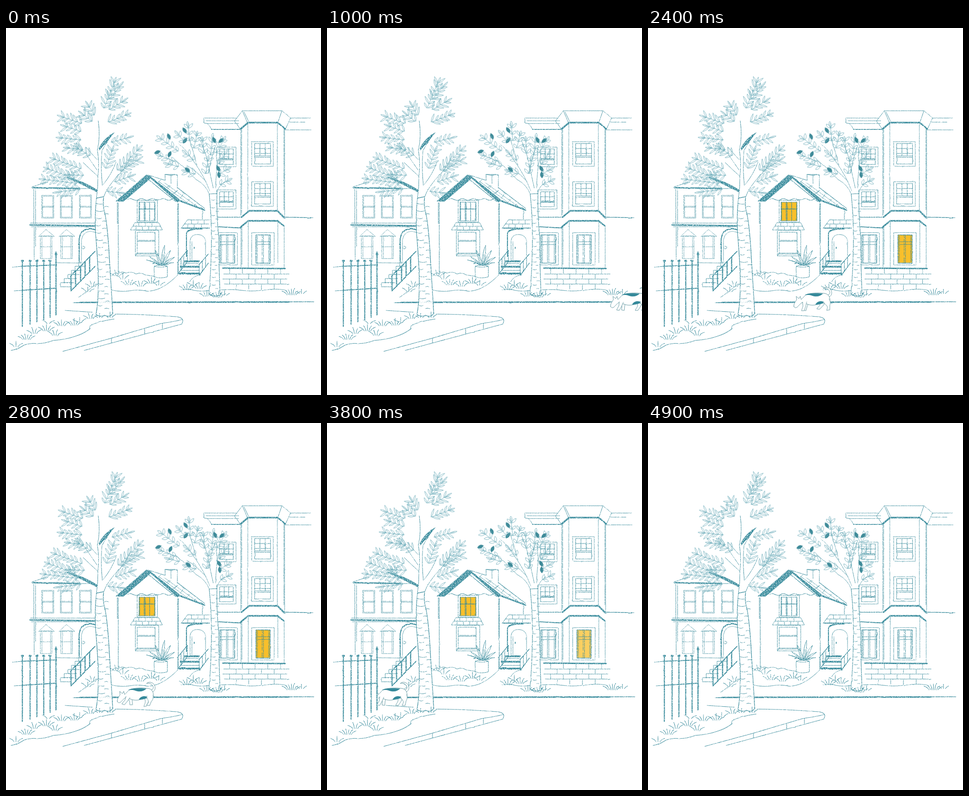
An HTML page that plays this animation: 693x807 px, repeating every 5 s.

```html
<!DOCTYPE html>
<html lang="en">
<head>
<meta charset="utf-8">
<title>Quiet street</title>
<style>
html, body { margin: 0; width: 100%; height: 100%; overflow: hidden; background: #fff; }
svg { display: block; width: 100%; height: 100%; }
path { fill: none; stroke: #35899a; stroke-linecap: round; stroke-linejoin: round; }
.solid { fill: #35899a; stroke: none; }
.white { fill: #fff; }
.leaf path { stroke: #70aebb; stroke-width: .9; }
.leaf .dark { fill: #3f8b99; stroke: #3f8b99; }
#pup path { stroke: #5a919b; stroke-width: .9; }
#pup .solid { fill: #35899a; stroke: none; }
.glow { fill: #f8bf2b; opacity: 0; }
#glowR { animation: glowR 5s infinite; }
#glowM { animation: glowM 5s infinite; }
@keyframes glowR {
  0%, 26% { opacity: 0; animation-timing-function: steps(3); }
  32%, 74% { opacity: 1; animation-timing-function: steps(4); }
  82%, 100% { opacity: 0; }
}
@keyframes glowM {
  0%, 38% { opacity: 0; animation-timing-function: steps(3); }
  44%, 84% { opacity: 1; animation-timing-function: steps(5); }
  94%, 100% { opacity: 0; }
}
.leaf { animation: sway 2.5s infinite; }
.leaf.b { --r: .35deg; }
@keyframes sway {
  0%, 100% { transform: translateX(-1.9px) rotate(calc(var(--r, .15deg) * -1)); animation-timing-function: steps(5); }
  20% { transform: translateX(1px) rotate(0deg); animation-timing-function: steps(5); }
  40% { transform: translateX(2px) rotate(var(--r, .15deg)); animation-timing-function: steps(5); }
  60% { transform: translateX(1.6px) rotate(.1deg); animation-timing-function: steps(5); }
  80% { transform: translateX(0) rotate(0deg); animation-timing-function: steps(5); }
}
#leaves1 .leaf { transform-origin: 206px 370px; }
#leaves2 .leaf { transform-origin: 457px 365px; }
#pup { animation: walk 5s infinite; }
@keyframes walk {
  0%, 12% { transform: translateX(709px); animation-timing-function: steps(4); }
  20% { transform: translateX(623px); animation-timing-function: steps(7); }
  34% { transform: translateX(479px); animation-timing-function: steps(7); }
  48% { transform: translateX(320px); animation-timing-function: steps(8); }
  64% { transform: translateX(168px); animation-timing-function: steps(11); }
  86% { transform: translateX(36px); animation-timing-function: steps(2); }
  90%, 100% { transform: translateX(-100px); }
}
.leg { animation: step .8s infinite; }
.leg.far { animation-delay: -.4s; }
.front { transform-origin: 25px 602px; }
.hind { transform-origin: 71px 600px; }
@keyframes step {
  0%, 100% { transform: rotate(-11deg); animation-timing-function: steps(4); }
  50% { transform: rotate(11deg); animation-timing-function: steps(4); }
}
</style>
</head>
<body>
<svg viewBox="0 0 693 807" preserveAspectRatio="none">
  <defs>
    <filter id="chalk" filterUnits="userSpaceOnUse" x="0" y="0" width="693" height="807" color-interpolation-filters="sRGB">
      <feTurbulence type="fractalNoise" baseFrequency=".07" numOctaves="2" seed="4" result="wob"/>
      <feDisplacementMap in="SourceGraphic" in2="wob" scale="2" xChannelSelector="R" yChannelSelector="G" result="ink"/>
      <feTurbulence type="fractalNoise" baseFrequency=".6" numOctaves="2" seed="9"/>
      <feColorMatrix values="0 0 0 0 0  0 0 0 0 0  0 0 0 0 0  3.6 0 0 0 -.85" result="grain"/>
      <feComposite in="ink" in2="grain" operator="in"/>
    </filter>
    <clipPath id="pastFence"><rect x="112" y="540" width="581" height="100"/></clipPath>
  </defs>
  <rect class="glow" id="glowR" x="550" y="455" width="31" height="61"/>
  <rect class="glow" id="glowM" x="293" y="383" width="35" height="41"/>
  <g id="back" filter="url(#chalk)"></g>
  <g clip-path="url(#pastFence)">
    <g id="pup">
      <path d="M77 592C86 589 86 579 80 573C76 569 68 569 65 573C70 571 76 573 79 578C82 584 78 587 74 587Z" class="white"/>
      <g class="leg far front"><path class="white" d="M22 602L26 612L25 620L31 621L32 611L34 602"/></g>
      <g class="leg far hind"><path class="white" d="M60 600C60 608 62 611 57 617L55 621L61 621L67 612L72 600"/></g>
      <path class="white" d="M1 612C0 606 5 602 7 597L6 590L12 595L15 590L17 597C22 593 25 587 31 585C43 582 61 582 71 584C79 587 81 594 80 602C74 608 68 605 62 605C50 610 39 611 30 607C25 606 22 605 20 603C15 606 11 611 8 614C5 616 1 615 1 612Z"/>
      <path class="solid" d="M25 587C34 582 54 583 65 584C58 591 49 592 39 588C33 586 30 588 25 587Z"/>
      <path class="solid" d="M48 608C52 601 60 599 66 602C67 606 59 608 48 608Z"/>
      <g class="leg front"><path class="white" d="M20 602L19 611L14 620L20 621L25 612L29 603"/></g>
      <g class="leg hind"><path class="white" d="M66 601C66 607 73 610 72 615L69 621L76 621L78 611C81 607 81 601 79 597"/></g>
    </g>
  </g>
  <g id="trunks" filter="url(#chalk)"></g>
  <g id="leaves1"></g>
  <g id="leaves2"></g>
</svg>
<script>
const NS = "http://www.w3.org/2000/svg";
const $ = id => document.getElementById(id);
let layer = $("back"), seed = 7;
const rnd = () => (seed = seed * 16807 % 2147483647) / 2147483647;
const n = v => v.toFixed(1);

function ink(d, w = 1, cls = "", to = layer) {
  const p = document.createElementNS(NS, "path");
  p.setAttribute("d", d);
  p.setAttribute("stroke-width", w);
  if (cls) p.setAttribute("class", cls);
  return to.appendChild(p);
}
const box = (x, y, x2, y2) => `M${x} ${y}H${x2}V${y2}H${x}Z`;

function tuft(x, y, count, size) {
  let d = "";
  for (let i = 0; i < count; i++) {
    const k = count > 1 ? i / (count - 1) * 2 - 1 : 0;
    const h = size * (1 - .45 * Math.abs(k)) * (.8 + .4 * rnd());
    const x0 = x + k * count * 1.4;
    d += `M${n(x0)} ${n(y)}Q${n(x0 + k * 2)} ${n(y - h * .6)} ${n(x0 + k * size * .75)} ${n(y - h)}`;
  }
  ink(d, 1.1);
}

// Right building
ink("M508 198H435L436 209L443 210L449 217L452 223H517M440 204H512M443 210H512", .9);
ink("M452 223H517", 1.6);
ink("M520 182H607L626 198L615 222L598 208L607 182M520 182L503 204L515 222L531 208L520 182M524 185L534 206", 1);
ink("M517 221L533 208H598L614 222", 3.6);
ink("M626 198H670M624 207H658M614 224H671", 1);
ink("M516.5 223V412M518.5 223V410M532 211V402M597 211V402M613 223V415M611.5 223V400", .9);
ink("M466 416H519M613 416L675 417", 1.3);
ink("M518 416L535 402H597L613 418", 3.4);
ink("M516 438L533 424H597L611 435", 3.4);
ink("M468 437L517 440", 2.2);
ink("M517 440V527M519 440V520M533 426V527M598 426V516M612 435V528", .9);

function sash(x, y, w, h) {
  const x2 = x + w, y2 = y + h, a = x + 6, b = x2 - 6, m = y + h * .58;
  ink(box(x, y, x2, y2), .9);
  ink(box(a, y + 4, b, y2 - 5) + `M${a} ${m}H${b}M${a} ${m + 3}H${b}`, 1.1);
  const third = (b - a) / 3;
  ink(`M${a + third} ${y + 4}V${m}M${b - third} ${y + 4}V${m}M${a} ${y + 15}H${b}M${a} ${y + 26}H${b}`, 1.1);
}
sash(541, 250, 47, 54);
sash(541, 338, 47, 54);
sash(464, 262, 42, 43);
sash(464, 356, 42, 42);

function casement(x, a, b, x2) {
  const c = (a + b) / 2;
  ink(box(x, 450, x2, 521), .9);
  ink(box(a, 455, b, 517), 1.7);
  ink(`M${c - 2} 456V517M${c + 1} 456V517M${a} 470H${b}M${a} 476H${b}M${a + 3} 456V516M${b - 3} 456V516`, 1);
}
casement(541, 550, 581, 590);
casement(468, 471, 503, 509);

ink("M477 528L614 529", 3);
ink("M479 541H623M477 552H618M480 563H622M473 576Q500 574 520 577T570 576T617 577", 1);
let ticks = "";
for (let r = 0; r < 4; r++)
  for (let x = 492 + (r % 2) * 14; x < 618; x += 28) ticks += `M${x} ${530 + r * 11.5}v10`;
ink(ticks, 1);

// Street
ink("M148 604L300 603L677 602", 1.4);
ink("M163 603.5L330 603L622 602.5", 3.2);

// Middle house
ink("M310 323L242 381L258 382L318 331Z", 1, "solid");
ink("M309 323L318 326L382 377L378 384Z", 1, "solid");
ink("M309 323L242 381M258 382L313 333L374 382M312 323L350 335M377 351L437 397", 1.1);
ink("M380 379L436 400", 3.4);
ink("M350 335V322L363 324L377 322V352M363 324V342M350 322L377 322", 1);
ink("M334 336L397 383M348 340L420 392M341 333L335 339M362 347L355 355M378 357L370 364M366 366L376 358M390 366L383 374M404 377L396 386M418 386L412 392M352 352L360 346", .9);
ink("M268 377Q274 373 280 377T292 377T304 377T316 377T328 377T340 377T352 377T366 376", 1.1);
ink("M247 383V537M245 384V430M379 386V540M378 386V470M432 402V420", 1.1);
ink(box(289, 379, 333, 427) + box(293, 383, 328, 424), 1);
ink("M304 383V424M306 383V424M316 383V424M293 398H328M294 383V424M327 383V424", 1.3);
ink("M284 428H336L344 444H274ZM279 436H340M292 429V436M306 429V436M321 429V436M286 437V443M300 437V443M314 437V443M330 437V443", 1);
ink(box(285, 445, 336, 501) + box(289, 449, 328, 495) + "M289 467H328M289 469H328M284 497H336M289 495L285 501M328 495L336 501", 1);

// Porch and steps
ink("M399 422H448M399 422L386 440M392 431H446M408 423V430M422 423V430M436 423V430M400 432V439M414 432V439M430 432V439", 1);
ink("M386 440H447", 2.2);
ink("M397 503V452Q399 444 409 442M399 448Q408 441 432 442", 2.2);
ink("M405 512V467Q407 454 422 454Q437 455 439 468V500M409 510V470", .9);
ink("M414 482v3", 2);
ink("M393 513H424M384 525H424M382 540H425", 4);
ink("M390 518H424M386 533H424", 1);
ink("M377 516L399 489M378 541L399 514M425 520L445 497M426 543L445 517", 1.6);
ink("M378 515V541M385 508V532M391 500V524M399 489V514M425 519V543M432 512V535M439 504V526", 1.2);

// Plant
ink("M326 524V547Q340 552 355 547V524Q340 519 326 524Q340 528 355 524", 1);
for (const [x, y] of [[309, 510], [315, 502], [329, 489], [349, 477], [362, 489], [371, 504], [369, 516], [322, 518]]) {
  const bx = 341 + (x - 341) * .12, mx = (bx + x) / 2, my = (521 + y) / 2 - 4;
  ink(`M${n(bx - 2)} 522Q${n(mx - 4)} ${my} ${x} ${y}Q${n(mx + 4)} ${my + 2} ${n(bx + 3)} 522M${n(bx)} 521L${n(mx)} ${my + 2}`, 1);
}

// Yards
ink("M233 545Q239 535 246 540Q256 534 264 539Q276 534 286 541Q297 536 306 543L326 546M232 576Q252 581 272 578Q290 574 312 579Q334 577 346 568Q360 561 378 543", 1);
ink("M384 576Q404 573 414 577Q430 580 448 577M404 558Q412 544 428 543M160 592Q178 580 199 562", 1);
for (const [x, y, c] of [[244, 545, 4], [270, 565, 5], [296, 568, 4], [320, 562, 5], [257, 552, 3], [336, 566, 3], [398, 576, 5], [425, 573, 5], [412, 566, 3], [190, 569, 4], [180, 580, 3]])
  tuft(x, y, c, 13);
tuft(628, 587, 7, 15);
tuft(650, 584, 3, 9);

// Left house
ink("M58 351L162 353M53 433L200 435", 3);
ink("M58 349L92 338M162 353H196M54 429H197M55 437H199", 1);
ink("M61 354V430M65 354V430M62 438V509M65 438V480M200 380V432", 1);
for (const x of [79, 120, 162])
  ink(box(x, 368, x + 26, 418) + box(x + 2, 370, x + 24, 416) + `M${x} 392H${x + 26}M${x} 394H${x + 26}`, .8);
for (const x of [76, 121])
  ink(box(x, 457, x + 25, 507) + `M${x - 4} 458L${x + 12} 443L${x + 30} 458ZM${x + 3} 460V506M${x + 22} 460V506M${x} 481H${x + 25}`, .8);
ink("M161 513V464Q164 442 186 441L202 445", 2.4);
ink("M166 512V466Q169 448 186 447L200 450M110 516L166 517", .9);
ink("M169 480Q174 479 173 484Q169 488 167 483", 1);
let stairs = "M120 569";
for (let i = 0; i < 6; i++) stairs += `h${i ? 23 - i * 2 : 23}M${120 + i * 8} ${569 - i * 9}v-9h8`;
ink(stairs + "M128 560H146M136 551H144M144 542H150M152 533H160M160 524H170", 1);
ink("M142 546L196 491M143 578L196 524", 2);
ink("M143 545V578M153 535V568M164 524V557M174 514V547M184 504V536", 2.6);

// Fence
ink("M14 526L34 524M18 578L34 577", 1);
ink("M34 524L111 521M34 577L111 572", 2.2);
[36, 53, 68, 83, 97].forEach((x, i) => {
  ink(`M${x} 515V${656 - i * 5}`, 2.4);
  ink(`M${x - 1} 512h2`, 4.5);
});
ink("M110 500V631", 2.6);
ink("M110 490L107 498L110 503L113 498Z", 1, "solid");

// Front verge and kerb
ink("M11 709Q28 706 40 697Q56 692 68 694Q86 694 104 687Q132 685 152 678Q174 671 185 661Q181 654 195 650Q215 643 238 640", 1.1);
ink("M130 621L190 625M240 629Q310 630 376 635Q389 637 389 644L387 651L320 669L172 709M388 641Q378 644 340 650L232 682L125 711M344 650V661M305 661V672M232 682V692", 1.1);
for (const [x, y, c] of [[22, 701, 3], [45, 685, 6], [62, 672, 4], [89, 666, 5], [108, 676, 4], [122, 655, 5], [150, 654, 5], [162, 648, 3], [186, 639, 4], [93, 650, 2]])
  tuft(x, y, c, 14);

// Trunks
layer = $("trunks");
ink("M199 374Q195 410 197 452Q203 520 203 565Q203 604 198 630Q205 636 218 632Q226 637 235 629Q231 560 227 500Q224 440 217 405Q212 390 215 371Z", 1.4, "white");
ink("M199 374Q203 350 202 326Q184 310 170 296M215 371Q221 352 246 325Q266 305 274 282M214 344Q232 322 242 295M202 326Q206 300 201 268Q208 240 203 204M212 346Q208 310 211 270Q224 245 238 230M201 290Q188 276 176 262M200 312L174 274", 1);
ink("M201 357Q180 342 135 329Q168 345 200 361Z", 2, "solid");
ink("M204 270Q211 250 237 230Q226 248 208 266Z", 1, "solid");
ink("M135 329Q168 336 201 357M205 265Q214 245 236 232", 2);
let bark = "";
for (let y = 386; y < 624; y += 16) {
  const l = y > 470 ? 203 : 199, w = 8 + rnd() * 9;
  bark += `M${l} ${y}q${n(w / 2)} 3 ${n(w)} 0M${n(l + 13 + rnd() * 5)} ${y + 7}q4 -2 ${n(6 + rnd() * 4)} 0`;
}
ink(bark, 1);
tuft(206, 637, 3, 9);
tuft(229, 637, 3, 11);

ink("M447 365Q452 410 452 470Q451 540 446 586Q456 592 471 587Q468 520 468 460Q463 410 464 364Z", 1.2, "white");
ink("M447 365Q440 345 418 333Q396 310 372 290M464 364Q464 350 482 338M448 358Q436 325 412 292Q400 270 380 255M456 352Q448 315 440 280Q434 262 428 248M461 352Q462 315 468 285M420 302Q412 270 402 240M440 338Q420 315 398 302M445 320Q450 290 460 262", .9);
bark = "";
for (let y = 378; y < 580; y += 17) bark += `M${y < 460 ? 452 : 453} ${y}q4 2 8 0M${n(459 + rnd() * 3)} ${y + 8}h6`;
ink(bark, .9);
tuft(442, 590, 5, 12);
tuft(465, 592, 6, 13);
tuft(481, 588, 3, 9);

// Foliage: pairs of leaves along each twig
function leaf(x, y, a, len, fat) {
  const c = Math.cos(a), s = Math.sin(a);
  const at = (u, v) => `${n(x + c * u * len - s * v * fat)} ${n(y + s * u * len + c * v * fat)}`;
  return `M${at(0, 0)}Q${at(.45, 1)} ${at(1, 0)}Q${at(.5, -1)} ${at(0, 0)}`;
}

function foliage(id, twigs, gap, len, fat) {
  const d = ["", ""];
  twigs.forEach(([x0, y0, x1, y1, from = .3]) => {
    const dx = x1 - x0, dy = y1 - y0, size = Math.hypot(dx, dy), a = Math.atan2(dy, dx);
    d[0] += `M${n(x0 + dx * from)} ${n(y0 + dy * from)}L${n(x1 - dx * .08)} ${n(y1 - dy * .08)}`;
    let i = 0;
    for (let s = size * from; s < size - len * .7; s += gap, i++) {
      const k = s / size, x = x0 + dx * k, y = y0 + dy * k;
      for (const side of [-1, 1]) {
        const turn = a + side * (.55 + rnd() * .4), l = len * (.75 + rnd() * .45);
        d[(i + (side > 0)) % 2] += leaf(x + side, y, turn, l, fat);
      }
    }
    d[1] += leaf(x1 - dx / size * len, y1 - dy / size * len, a, len, fat);
  });
  return d.map((path, i) => {
    const g = document.createElementNS(NS, "g");
    g.setAttribute("class", i ? "leaf b" : "leaf");
    $(id).appendChild(g);
    ink(path, .9, "", g);
    return g;
  });
}

foliage("leaves1", [
  [206, 205, 246, 108], [222, 165, 262, 118, .2], [212, 190, 272, 154], [206, 215, 279, 187],
  [204, 205, 178, 160], [204, 215, 162, 182], [204, 222, 115, 191, .4], [203, 240, 122, 212, .45],
  [203, 250, 112, 240, .4], [200, 272, 128, 262, .4], [208, 258, 284, 238, .35], [202, 290, 150, 258],
  [196, 320, 98, 284, .3], [185, 345, 74, 331, .25], [180, 342, 84, 305, .3], [190, 352, 104, 362, .3],
  [218, 342, 303, 258, .35], [228, 332, 304, 283, .35], [222, 345, 288, 322, .3], [215, 358, 266, 364, .2],
  [214, 330, 240, 258, .3], [190, 325, 130, 322]
], 10, 16, 3.4);

const sides = foliage("leaves2", [
  [400, 285, 334, 236, .3], [390, 300, 331, 276, .3], [395, 308, 348, 296, .3], [402, 260, 374, 225, .3],
  [408, 262, 402, 205, .25], [412, 280, 424, 226, .3], [438, 285, 434, 238, .2], [450, 300, 458, 231, .3],
  [456, 290, 486, 238, .3], [462, 312, 490, 268, .3], [464, 325, 498, 306, .2], [462, 350, 500, 331, .3],
  [430, 325, 388, 312, .3], [425, 300, 390, 268, .3], [440, 330, 448, 280, .2]
], 14, 13, 5.2);

const darks = [[358, 232, 1.2], [392, 219, 1], [400, 242, 2.2], [342, 270, 2.8], [365, 271, 2],
  [458, 240, 1.2], [470, 252, -.7], [466, 303, 1.1], [470, 316, 1.5], [396, 307, .7]];
darks.forEach(([x, y, a], i) => ink(leaf(x, y, a, 14, 7), .8, "dark", sides[i % 2]));
</script>
</body>
</html>
```
